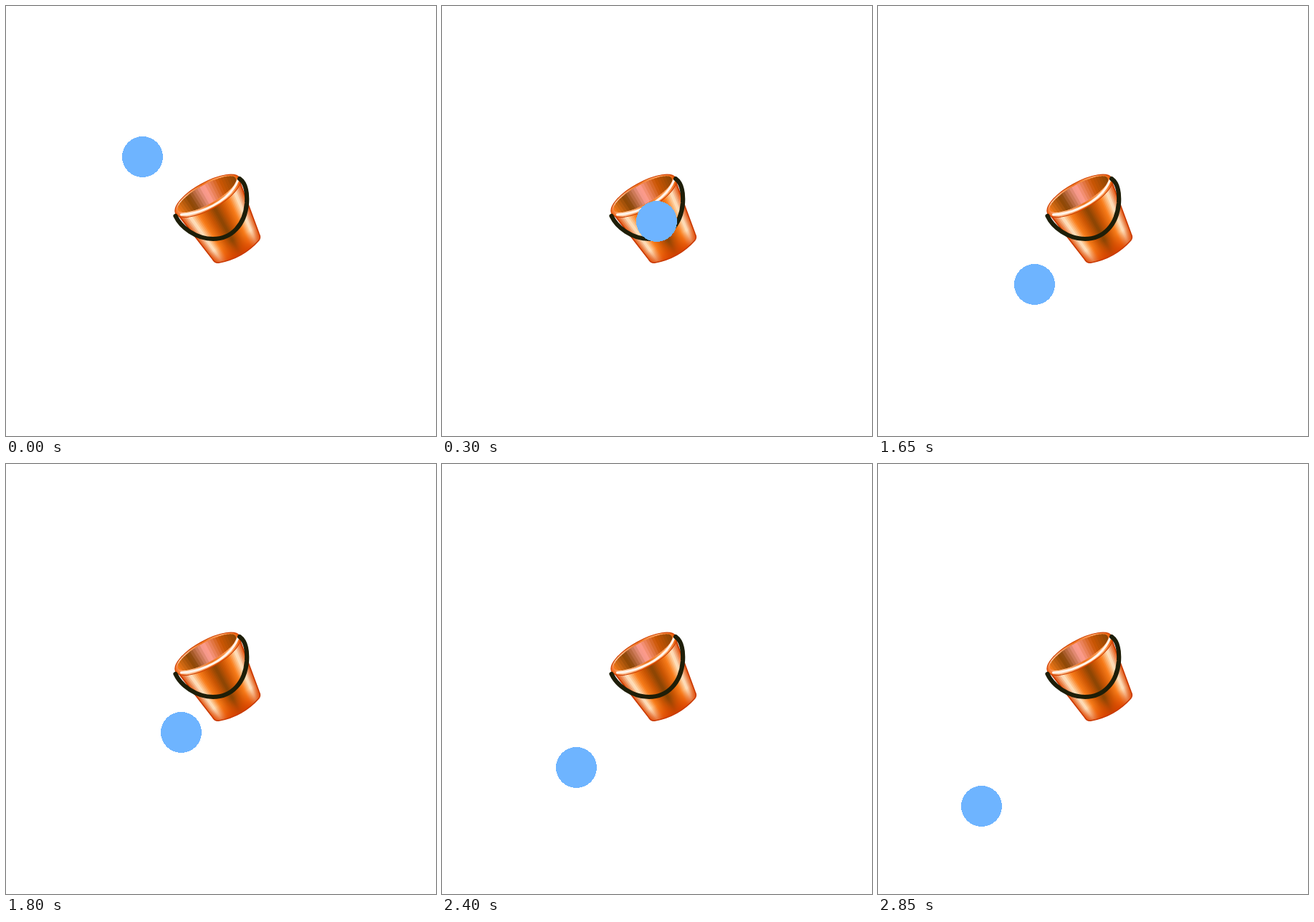
An HTML page for the animation above (3 s loop, 600 by 600 pixels).

```html
<!DOCTYPE html>
<html lang="en">
<head>
<meta charset="utf-8">
<title>Ball and bucket</title>
<style>
html, body { margin: 0; width: 100%; height: 100%; overflow: hidden; background: #fff; }
svg { display: block; width: 100vw; height: 100vh; }
</style>
</head>
<body>
<svg viewBox="0 0 600 600">
  <defs>
    <path id="side" d="M-49 4 L-37 82 Q-37 88 -32 90 Q0 101 32 90 Q37 88 37 82 L49 4"/>
    <clipPath id="sideClip"><use href="#side"/></clipPath>
    <clipPath id="mouthClip"><ellipse cx="0" cy="-1.5" rx="46" ry="13.5"/></clipPath>
    <linearGradient id="base" x1="0" y1="72" x2="0" y2="96" gradientUnits="userSpaceOnUse">
      <stop offset="0" stop-color="#e85000" stop-opacity="0"/>
      <stop offset="1" stop-color="#d84000" stop-opacity=".9"/>
    </linearGradient>
    <linearGradient id="rim">
      <stop offset="0" stop-color="#f06010"/>
      <stop offset=".12" stop-color="#ffc9a0"/>
      <stop offset=".5" stop-color="#ee7420"/>
      <stop offset=".8" stop-color="#ffa866"/>
      <stop offset="1" stop-color="#e85800"/>
    </linearGradient>
  </defs>
  <g transform="translate(281 264) rotate(-29)" fill="none">
    <g clip-path="url(#sideClip)">
      <g id="wall"></g>
      <rect x="-50" y="72" width="100" height="30" fill="url(#base)"/>
    </g>
    <use href="#side" stroke="#c83800" stroke-width="1.5"/>
    <ellipse cx="0" cy="1" rx="51" ry="18.8" fill="url(#rim)" stroke="#d04000" stroke-width="1.2"/>
    <g id="mouth" clip-path="url(#mouthClip)"></g>
    <path d="M-45 6 Q-26 16 0 16.5 Q30 17 48 2" stroke="#fff4ea" stroke-width="3.2" stroke-linecap="round"/>
  </g>
  <path d="M236.5 293 C244 309 265 325 289 325 C315 325 333.5 305 336 275 C337 258 333 246 326 241"
    fill="none" stroke="#1e1e08" stroke-width="6.2" stroke-linecap="round"/>
  <circle id="ball" r="28.5" fill="#6eb4ff" shape-rendering="crispEdges"/>
</svg>
<script>
const LOOP = 3000, STEP = 150;
const ball = document.getElementById('ball');

const brown = [136, 68, 4], rust = [204, 86, 4], orange = [248, 124, 26];
const cream = [255, 232, 200], red = [222, 72, 0], pink = [255, 160, 150];

// Colour at t (0 to 1) along evenly spaced key colours
function ramp(colors, t) {
  const p = t * (colors.length - 1), i = Math.min(Math.floor(p), colors.length - 2);
  return `rgb(${colors[i].map((c, j) => Math.round(c + (colors[i + 1][j] - c) * (p - i)))})`;
}

// Vertical bands that narrow from the top half-width to the bottom one
function bands(id, count, [y0, w0], [y1, w1], color) {
  let out = '';
  for (let i = 0; i < count; i++) {
    const l = 2 * i / count - 1, r = Math.min(1, l + 3 / count);
    out += `<path fill="${color(l + 1 / count)}" d="M${l * w0} ${y0}H${r * w0}L${r * w1} ${y1}H${l * w1}Z"/>`;
  }
  document.getElementById(id).innerHTML = out;
}
bands('wall', 40, [0, 50], [102, 34.5], u => ramp([brown, rust, orange, cream, red], Math.abs(u)));
bands('mouth', 24, [-18, 49], [18, 44], u => ramp([orange, brown, pink, rust, brown], (u + 1) / 2));

// Ball centre for each step: drop in, rest, rise, then fall away
function place(n) {
  if (n < 2) return [190 + 26 * n, 210 + 31 * n];
  if (n < 10) return [299, 300];
  const k = n - 10, f = n - 12;
  if (f <= 0) return [189 + 30.5 * k - 1.5 * k * k, 406 - 20 * k + 2 * k * k];
  return [243.15 - 14.1 * f, 374.95 + 8.3 * f + 0.9 * f * f];
}

const start = performance.now();
function tick() {
  const time = (performance.now() - start) % LOOP;
  const [x, y] = place(Math.floor(time / STEP));
  ball.setAttribute('cx', Math.round(x) + 0.5);
  ball.setAttribute('cy', Math.round(y) + 0.5);
  requestAnimationFrame(tick);
}
tick();
</script>
</body>
</html>
```
